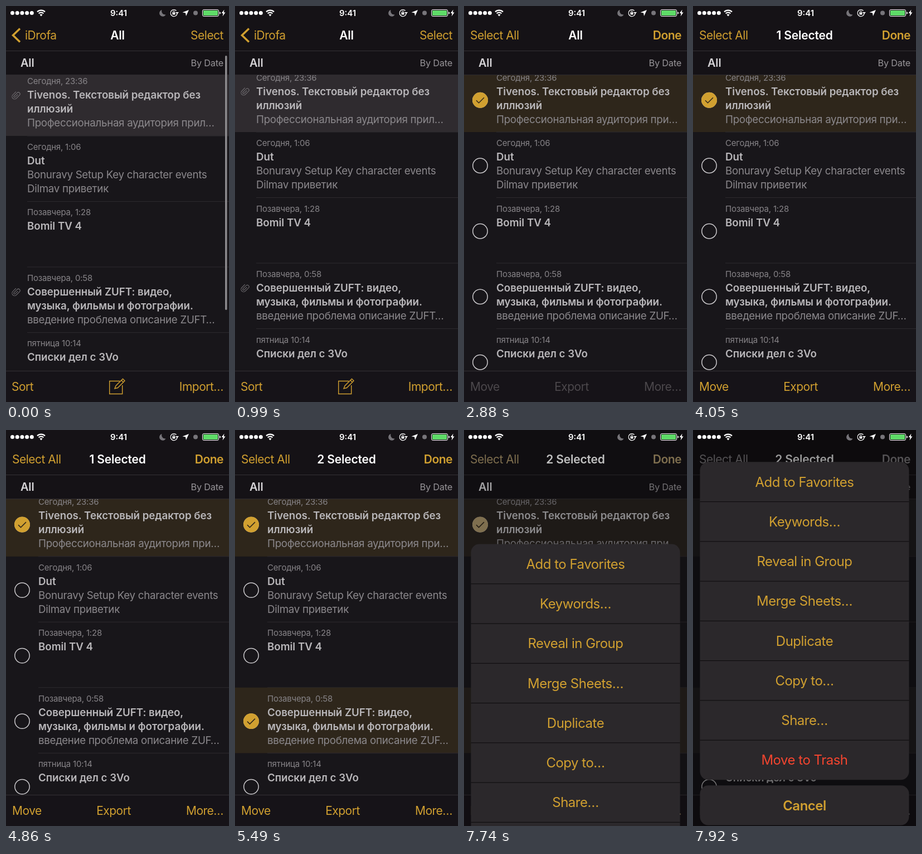
These frames come from a looping animation (400x710 px, 8 s). An HTML page:

```html
<!DOCTYPE html>
<html lang="en">
<head>
<meta charset="utf-8">
<title>Sheet list</title>
<style>
  html, body { margin: 0; width: 100%; height: 100%; overflow: hidden; background: #18161a; }
  svg { display: block; --tint: #d1a030; --bar: #4b484c; }
  text { font: 400 21px Inter, sans-serif; letter-spacing: -.5px; fill: var(--tint); white-space: pre; }
  .bold { font-weight: 600; }
  .title { font-weight: 600; letter-spacing: -.2px; fill: #fff; }
  .date { font-size: 15px; letter-spacing: -.2px; fill: #878488; }
  .head { font: 600 18.75px Inter, sans-serif; letter-spacing: -.05px; fill: #b9b7ba; }
  .body { font-size: 18.75px; letter-spacing: -.3px; fill: #8b888c; }
  .sheet text { font-size: 24px; fill: #d1a030; }
  .sheet .red { fill: #f5452f; }
  .mid { text-anchor: middle; }
  .end { text-anchor: end; }
  .edit-tools text { fill: var(--bar); }
  .line { fill: none; stroke: var(--tint); }
</style>
</head>
<body>
<svg width="400" height="710" viewBox="0 0 400 710">
  <defs>
    <clipPath id="listArea"><rect y="123" width="400" height="531"/></clipPath>
    <path id="clip" d="M-3 5V-3a3 3 0 0 1 6 0V5a4.5 4.5 0 0 1-9 0V-3M0-2V5a1.5 1.5 0 0 1-3 0" fill="none" stroke="#777478" transform="rotate(45)"/>
  </defs>
  <rect width="400" height="710" fill="#18161a"/>
  <g clip-path="url(#listArea)"><g id="list"></g></g>

  <rect width="400" height="123" fill="#151216"/>
  <path d="M0 80.5H400" stroke="#343135"/>
  <path d="M0 123.5H400" stroke="#2e2b2f"/>
  <text x="26" y="109" class="bold" style="font-size:20px;letter-spacing:-.2px;fill:#d6d4d7">All</text>
  <text x="390" y="108" class="end" style="font-size:16.25px;letter-spacing:-.2px;fill:#979498">By Date</text>
  <rect id="scrollbar" x="393" y="89" width="3.5" height="456" rx="1.75" fill="#8c8a8d"/>

  <text id="title" x="200" y="60" class="title mid">All</text>
  <g id="browseNav">
    <path class="line" d="M25 40.5L12.5 52.5 25 64.5" stroke-width="3.5"/>
    <text x="34" y="60">iDrofa</text>
    <text x="390" y="60" class="end">Select</text>
  </g>
  <g id="editNav">
    <text x="11" y="60">Select All</text>
    <text x="390" y="60" class="end bold">Done</text>
  </g>

  <rect y="654" width="400" height="56" fill="#161318"/>
  <path d="M0 654.5H400" stroke="#343135"/>
  <g id="browseTools">
    <text x="10" y="690">Sort</text>
    <path class="line" stroke-width="1.4" d="M204 672.5H185.7V695.5H208.7V680M195 686l2-5 12.5-12.5 3.5 3.5-12.5 12.5zM207 671l3.5 3.5"/>
    <text x="390" y="690" class="end">Import…</text>
  </g>
  <g id="editTools" class="edit-tools">
    <text x="11" y="690">Move</text>
    <text x="193" y="690" class="mid">Export</text>
    <text x="390" y="690" class="end">More…</text>
  </g>

  <rect id="shade" width="400" height="710"/>
  <g id="sheet" class="sheet"></g>

  <g id="status" fill="#fff">
    <g id="signal"></g>
    <path d="M56 10.5a10 10 0 0 1 14 0M58.7 13.5a6 6 0 0 1 8.6 0" fill="none" stroke="#fff" stroke-width="2.2"/>
    <path d="M63 18.5l-2.5-3a3.8 3.8 0 0 1 5 0z"/>
    <text x="202" y="18" class="title mid" style="font-size:15px;letter-spacing:0">9:41</text>
    <path d="M279.5 7a6 6 0 1 0 7 8.5 6.5 6.5 0 0 1-7-8.5z" fill="#77757a"/>
    <path d="M305.5 8.5a6 6 0 1 0 1.5 5.5" fill="none" stroke="#fff" stroke-width="1.3"/>
    <path d="M304 11h6l-3 3.5zM298.5 11.5h5v4h-5z"/>
    <path d="M299.5 12v-1.5a1.5 1.5 0 0 1 3 0V12" fill="none" stroke="#fff"/>
    <path d="M328 7l-5 11-1-5.5-5.5-1z"/>
    <circle cx="340" cy="12.5" r="4" fill="#77757a"/>
    <rect x="352.5" y="6.5" width="29" height="12" rx="2.5" fill="none" stroke="#fff"/>
    <rect x="354" y="8" width="26" height="9" rx="1" fill="#5fdc68"/>
    <path d="M383 10.5a2 2 0 0 1 0 4zM391.5 6.5l-5 6.5h3l-1 5.5 5-7h-3z"/>
  </g>
</svg>
<script>
const $ = id => document.getElementById(id);
const ROW = 117.5, CELL = 71.25, LOOP = 8000;
const clamp = v => Math.max(0, Math.min(1, v));
const ramp = (t, start, length) => clamp((t - start) / length);
const mix = (a, b, k) => `rgb(${a.map((v, i) => v + (b[i] - v) * k)})`;
const gold = [209, 160, 48], disabled = [75, 72, 76], dimmed = [140, 137, 140];

// Each row: date, heading lines, body lines (full and indented), attachment, time of selection
const rows = [
  { date: 'Сегодня, 23:36', head: ['Tivenos. Текстовый редактор без', 'иллюзий'],
    body: ['Профессиональная аудитория прил…'], short: 'Профессиональная аудитория при…', clip: true, pick: 2880 },
  { date: 'Сегодня, 1:06', head: ['Dut'], body: ['Bonuravy Setup Key character events', 'Dilmav приветик'] },
  { date: 'Позавчера, 1:28', head: ['Bomil TV 4'], body: [] },
  { date: 'Позавчера, 0:58', head: ['Совершенный ZUFT: видео,', 'музыка, фильмы и фотографии.'],
    body: ['введение проблема описание ZUFT…'], short: 'введение проблема описание ZUF…', clip: true, pick: 5220 },
  { date: 'пятница 10:14', head: ['Списки дел с 3Vo'], body: [] },
];

$('list').innerHTML = rows.map((row, i) => {
  const lines = [...row.head.map(s => ['head', s]), ...row.body.map(s => ['body', s])];
  return `<g transform="translate(0 ${i * ROW})">
    <rect class="fill" width="400" height="${ROW}"/>
    ${row.clip ? '<use href="#clip" class="clip" transform="translate(20 44.5)"/>' : ''}
    <g class="indent">
      <path d="M0 ${ROW}H400" stroke="#2d2a2e"/>
      <text y="25" class="date">${row.date}</text>
      ${lines.map(([kind, s], n) => `<text y="${51 + 25 * n}" class="${kind}">${s}</text>`).join('')}
    </g>
    <g class="mark">
      <circle r="13.2" fill="none" stroke="#cbc9cc" stroke-width="1.5"/>
      <g class="check"><circle r="14" fill="var(--tint)"/>
        <path d="M-7 .5L-2.5 5 7-4.5" fill="none" stroke="#2e261b" stroke-width="1.5"/></g>
    </g>
  </g>`;
}).join('');

rows.forEach((row, i) => {
  const g = $('list').children[i];
  for (const name of ['fill', 'clip', 'indent', 'mark', 'check', 'body'])
    row['$' + name] = g.querySelector('.' + name);
});

$('signal').innerHTML = [0, 1, 2, 3, 4].map(i => `<circle cx="${11.5 + 8.7 * i}" cy="12.5" r="3.5"/>`).join('');

const actions = ['Add to Favorites', 'Keywords…', 'Reveal in Group', 'Merge Sheets…', 'Duplicate', 'Copy to…', 'Share…', 'Move to Trash'];
$('sheet').innerHTML = `<g fill="#2b282b">
    <rect x="12.5" width="375" height="${8 * CELL}" rx="15"/>
    <rect x="12.5" y="${8 * CELL + 10}" width="375" height="${CELL}" rx="15"/></g>` +
  actions.map((s, i) => `<text x="200" y="${i * CELL + 44.3}" class="mid${i == 7 ? ' red' : ''}">${s}</text>` +
    (i ? `<path d="M12.5 ${i * CELL}h375" stroke="#0b090b"/>` : '')).join('') +
  `<text x="200" y="${8 * CELL + 54.3}" class="mid bold">Cancel</text>`;

function draw(t) {
  const scroll = 7 * (1 - ramp(t, 0, 450)) ** 3 + (t >= 4410 ? .8 : 0);
  const u = ramp(t, 1220, 360);
  const edit = 1 - (1 - u) ** 3;
  const swap = clamp(2 * u);
  const dim = ramp(t, 7590, 250);

  $('list').setAttribute('transform', `translate(0 ${108.5 + scroll})`);
  $('scrollbar').style.opacity = 1 - ramp(t, 150, 300);

  rows.forEach((row, i) => {
    const picked = t >= row.pick;
    row.$fill.style.fill = picked ? mix([46, 38, 27], [34, 31, 34], dim) : '#2f2b2f';
    row.$fill.style.opacity = picked ? 1 : i ? 0 : 1 - swap;
    row.$indent.setAttribute('transform', `translate(${38 + 20 * edit} 0)`);
    row.$mark.setAttribute('transform', `translate(${29 - 50 * (1 - edit)} 60.3)`);
    row.$mark.style.opacity = edit;
    row.$check.style.opacity = +picked;
    if (row.clip) row.$clip.style.opacity = 1 - swap;
    if (row.short) row.$body.textContent = u > 0 ? row.short : row.body[0];
  });

  $('browseNav').style.opacity = (1 - u) ** 2;
  $('editNav').style.opacity = edit;
  $('browseTools').style.opacity = 1 - swap;
  $('editTools').style.opacity = swap;
  $('title').textContent = t < 2930 ? 'All' : t < 5270 ? '1 Selected' : '2 Selected';

  const root = document.querySelector('svg').style;
  root.setProperty('--tint', mix(gold, dimmed, dim));
  root.setProperty('--bar', dim ? mix(gold, dimmed, dim) : mix(disabled, gold, ramp(t, 2880, 180)));

  // Critically damped spring brings the action sheet up
  const w = Math.max(0, t - 7590) * .01826;
  $('sheet').setAttribute('transform', `translate(0 ${46.25 + 664 * (1 + w) * Math.exp(-w)})`);
  $('shade').style.opacity = .4 * dim;
}

(function tick() {
  draw(performance.now() % LOOP);
  requestAnimationFrame(tick);
})();
</script>
</body>
</html>
```
